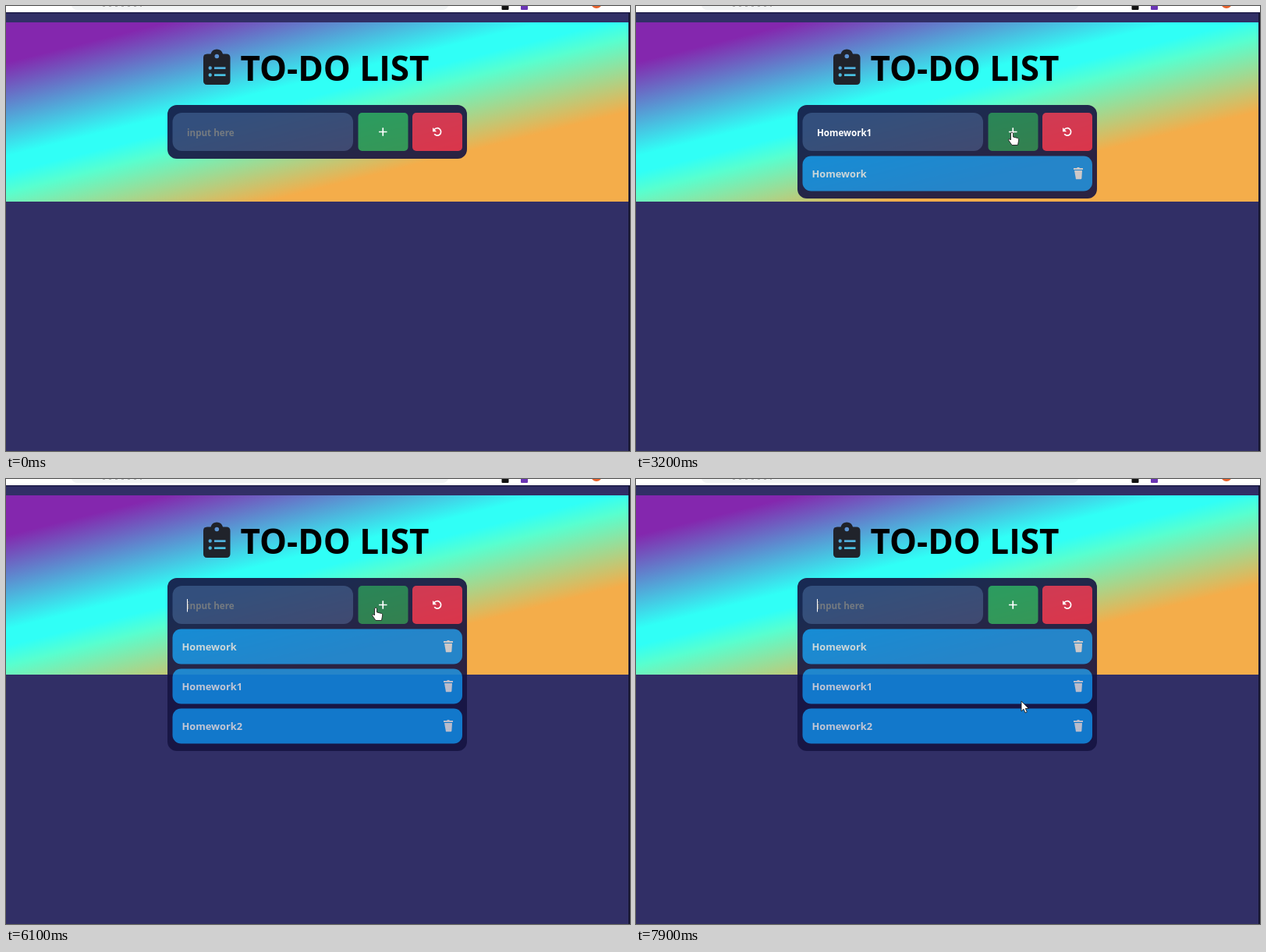
An HTML page for the animation above (8000 ms loop, 800 px wide and 571 px high).

```html
<!DOCTYPE html>
<html lang="en">
<head>
<meta charset="utf-8">
<title>To-do list</title>
<style>
html, body { margin: 0; width: 100%; height: 100%; overflow: hidden; background: #312f66; }
#sky {
  position: absolute; left: 0; top: 21px; width: 798px; height: 230px;
  background: linear-gradient(166deg, #8427ae 12%, #30fff6 40%, #30fff6 45%, #58ffcf 51%, #f4ad4a 73%);
}
svg { position: absolute; left: 0; top: 0; }
text { font-family: "Open Sans", "Noto Sans", sans-serif; white-space: pre; }
.bold { font-weight: 700; }
.line { fill: none; stroke: #fff; stroke-width: 1.7; }
</style>
</head>
<body>
<div id="sky"></div>
<svg width="800" height="571" viewBox="0 0 800 571">
  <defs>
    <g id="trash" fill="#c9ccd6">
      <path d="M-6-7h4l1-1h2l1 1h4v2h-12z"/>
      <path d="M-5-4h10l-.6 10q-.1 1.3-1.4 1.3h-6q-1.300-1.400-1.300z"/>
    </g>
    <filter id="shade" x="-10%" y="-10%" width="120%" height="130%">
      <feDropShadow dx="0" dy="1" stdDeviation="2" flood-opacity=".45"/>
    </filter>
  </defs>

  <!-- browser edge -->
  <path fill="#fff" d="M0 0h800v8h-800z"/>
  <path fill="#f1f3f4" d="M84 0h483q-2 5-8 5h-467q-6 0-8-5z"/>
  <path fill="#1d1c48" d="M0 8h800v1.500h-800z"/>
  <path fill="#15142f" d="M798 9h2v562h-2z"/>
  <rect x="635.500" y="-4" width="9" height="9" rx="1" fill="#111"/>
  <rect x="660" y="-4" width="9" height="9" rx="1" fill="#6a35b5"/>
  <circle cx="757" cy="-4" r="7" fill="#e8622c"/>
  <path stroke="#777" stroke-dasharray="3 5" d="M124 0h50"/>

  <!-- heading -->
  <path fill="#20232b" fill-rule="evenodd" d="M258 61.500h4.500a8 8 0 0 1 15.500 0h4.500q5 0 5 5v29.500q0 5-5 5h-24.500q-5 0-5-5v-29.500q0-5 5-5z
    M267.500 64.500a2.800 2.800 0 1 0 5.600 0a2.800 2.800 0 1 0-5.600 0z
    M259.500 79.500a2.200 2.200 0 1 0 4.400 0a2.200 2.200 0 1 0-4.400 0z
    M259.500 88.500a2.200 2.200 0 1 0 4.400 0a2.200 2.200 0 1 0-4.400 0z
    M267 78.200h14.500v2.800h-14.500z M267 87.200h14.500v2.800h-14.500z"/>
  <text class="bold" x="300.500" y="96" font-size="44">TO-DO LIST</text>

  <!-- list card -->
  <g opacity=".9">
    <rect id="card" x="207" y="127" width="384" rx="12" fill="#161442"/>
    <rect x="213.500" y="137" width="231.500" height="49" rx="12" fill="#343c70"/>
    <rect id="add" x="451.500" y="137" width="64" height="49" rx="5"/>
    <rect x="521" y="137" width="64" height="49" rx="5" fill="#d8294b"/>
    <g id="rows"></g>
  </g>
  <path class="line" d="M478 161.500h10.500M483.250 156.200v10.600"/>
  <path class="line" stroke-width="1.500" d="M549 158.800a4.700 4.700 0 1 1 .2 5.500"/>
  <path fill="#fff" d="M547 156v5.200h5.200z"/>
  <text id="entry" class="bold" x="232" y="166.800" font-size="11.600"></text>
  <path id="squiggle" fill="none" stroke="#b8304f" stroke-dasharray="1.500 1" d="M232 168.700h63"/>
  <path id="caret" stroke="#fff" d="M.5 154v16.500"/>

  <!-- message box -->
  <g id="alert">
    <rect x="227.500" y="5.500" width="343.500" height="100" rx="3" fill="#fff" stroke="#b5b5bd" filter="url(#shade)"/>
    <text x="239" y="31" font-size="11" fill="#333">velkantorin.github.io web sitesinin mesajı</text>
    <text x="239" y="52" font-size="9.400" fill="#333">Please enter a word.</text>
    <rect x="503.500" y="68.500" width="56" height="25" rx="3.500" fill="#fff" stroke="#2668b0" stroke-width="1.600"/>
    <rect x="505.500" y="70.500" width="52" height="21" rx="2" fill="#247fcf"/>
    <text x="531" y="84" font-size="8.700" font-weight="600" fill="#fff" text-anchor="middle">Tamam</text>
  </g>

  <g fill="#fff" stroke="#222" stroke-width=".9" stroke-linejoin="round">
    <path id="arrow" d="M0 0v13l3-2.700 2 4.700 2.300-1-2-4.500h4z"/>
    <path id="hand" d="M-1.500 1q1.500-2 3 0v5l6 1.500q1.500.5 1.200 2.500l-1.200 6.500h-7.500l-4.500-6.500q0-2 2-1l1 1z"/>
  </g>
</svg>
<script>
const LOOP = 8000, TICK = 100;
const el = id => document.getElementById(id);
const show = (id, on) => el(id).style.display = on ? "" : "none";

// time, typed text, caret visible, number of items
const states = [
  [0, "", 0, 0], [300, "", 1, 0], [400, "Home", 1, 0], [500, "Homework", 1, 0], [1000, "Homework", 0, 0],
  [1200, "", 1, 1], [1700, "", 0, 1], [2200, "", 1, 1],
  [2500, "Homework", 1, 1], [2600, "Homework1", 1, 1], [3100, "Homework1", 0, 1],
  [3400, "", 1, 2], [3900, "", 0, 2],
  [4200, "Homework", 1, 2], [4300, "Homework2", 1, 2], [4800, "Homework2", 0, 2], [5300, "Homework2", 1, 2],
  [5700, "", 1, 3], [6300, "", 0, 3], [7500, "", 1, 3]
];

// pointer trips: time, x, y
const trips = [
  [[2800, 640, 8], [3200, 482, 162], [3400, 481, 163], [3700, 600, -20]],
  [[4800, 640, 8], [5200, 482, 164], [5300, 479, 161], [5500, 478, 163], [5800, 478, 163],
   [6100, 474, 165], [6200, 474, 165], [6600, 475, 165], [7100, 531, 88], [7200, 531, 88],
   [7400, 528, 84], [7500, 528, 85], [7900, 494, 285], [8000, 494, 285]]
];
const alertFrom = 6500, alertTo = 7500;

const rows = ["Homework", "Homework1", "Homework2"].map((name, i) => {
  const y = 192.5 + i * 51;
  el("rows").insertAdjacentHTML("beforeend", `<g>
    <rect x="213.500" y="${y}" width="371.500" height="45" rx="11" fill="#0f81d7"/>
    <text class="bold" x="225.500" y="${y + 27.5}" font-size="12.800" fill="#d3d7e0">${name}</text>
    <use href="#trash" x="567" y="${y + 22.5}"/></g>`);
  return el("rows").lastElementChild;
});

function pointerAt(t) {
  const path = trips.find(p => t >= p[0][0] && t < p.at(-1)[0]);
  if (!path) return null;
  const i = path.findIndex(k => k[0] > t);
  const [a, b] = [path[i - 1], path[i]];
  const f = (t - a[0]) / (b[0] - a[0]);
  return [a[1] + (b[1] - a[1]) * f, a[2] + (b[2] - a[2]) * f];
}

function draw(now) {
  const t = Math.floor(now % LOOP / TICK) * TICK;
  const [, text, caret, count] = states.findLast(s => s[0] <= t);
  const alerting = t >= alertFrom && t < alertTo;

  el("card").setAttribute("height", count ? 69 + count * 51 : 69);
  rows.forEach((row, i) => row.style.display = i < count ? "" : "none");

  const entry = el("entry");
  entry.textContent = text || "input here";
  entry.setAttribute("fill", text ? "#fff" : "#747a80");
  const end = text ? entry.getComputedTextLength() : 0;
  el("caret").setAttribute("transform", `translate(${Math.round(232 + end)} 0)`);
  show("caret", caret);
  show("squiggle", text === "Homework");
  show("alert", alerting);

  const p = pointerAt(t);
  const over = p && p[0] > 451 && p[0] < 515 && p[1] > 137 && p[1] < 186;
  el("add").setAttribute("fill", over || alerting ? "#237a4d" : "#259356");
  const hand = over && !alerting;
  show("hand", hand);
  show("arrow", p && !hand);
  if (p) el(hand ? "hand" : "arrow").setAttribute("transform", `translate(${p})`);
}

const start = performance.now();
(function frame() {
  draw(performance.now() - start);
  requestAnimationFrame(frame);
})();
</script>
</body>
</html>
```
